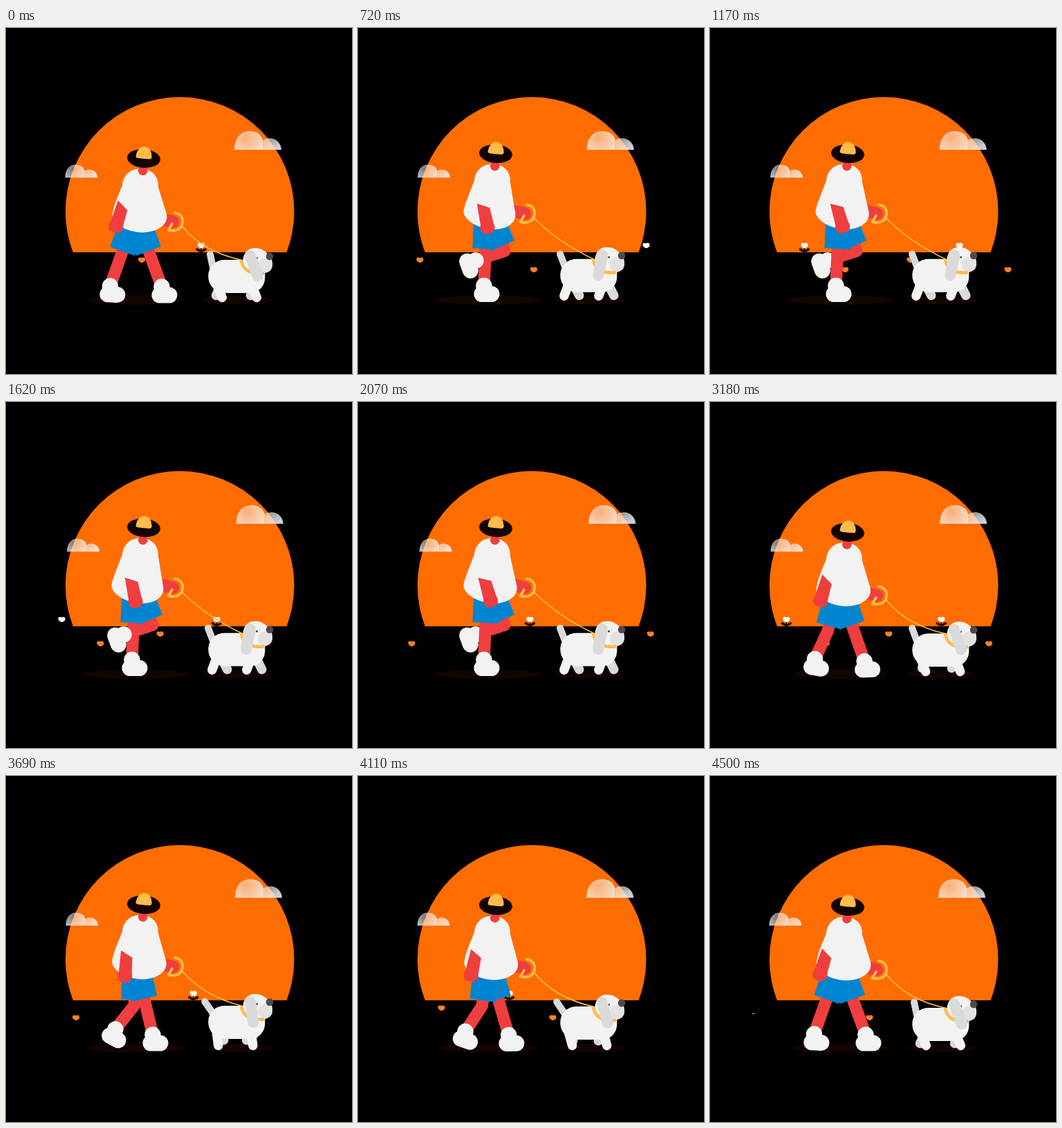
An HTML page with a canvas that plays this animation: 500 px wide and 500 px high, repeating every 4530 ms.

```html
<!DOCTYPE html>
<html lang="en">
<head>
<meta charset="utf-8">
<title>Sunset dog walk</title>
<style>
html, body { margin: 0; width: 100%; height: 100%; overflow: hidden; background: #000; }
canvas { display: block; width: 500px; height: 500px; }
</style>
</head>
<body>
<canvas id="stage" width="500" height="500"></canvas>
<script>
const ctx = document.getElementById('stage').getContext('2d');
const LOOP = 4530, STEP = 30, CYCLE = 900, TAU = Math.PI * 2;
const SUN = '#ff6d00', DARK = '#120400', SKIN = '#ef3e3e', WHITE = '#f2f2f2';
const BLUE = '#0085d0', GOLD = '#ffbc4d', GREY = '#dadada', ORANGE = '#ff8126';

const clamp = (v, lo, hi) => Math.min(hi, Math.max(lo, v));

function fillPath(color, build) {
  ctx.fillStyle = color;
  ctx.beginPath();
  build();
  ctx.fill();
}

function ellipse(x, y, rx, ry, color, angle = 0) {
  fillPath(color, () => ctx.ellipse(x, y, rx, ry, angle, 0, TAU));
}

const circle = (x, y, r, color) => ellipse(x, y, r, r, color);

function stroke(color, width, build, cap = 'round') {
  ctx.strokeStyle = color;
  ctx.lineWidth = width;
  ctx.lineCap = cap;
  ctx.lineJoin = 'round';
  ctx.beginPath();
  build();
  ctx.stroke();
}

function limb(points, width, color) {
  stroke(color, width, () => points.forEach(p => ctx.lineTo(p[0], p[1])));
}

function placed(x, y, angle, scale, draw) {
  ctx.save();
  ctx.translate(x, y);
  ctx.rotate(angle);
  ctx.scale(scale, scale);
  draw();
  ctx.restore();
}

// Smooth periodic curve through evenly spaced keys.
function cyclic(keys, phase) {
  const n = keys.length, pos = ((phase % 1) + 1) % 1 * n;
  const i = Math.floor(pos), s = pos - i;
  const [a, b, c, d] = [-1, 0, 1, 2].map(k => keys[(i + k + n) % n]);
  return b + s * ((c - a) / 2 + s * (a - 2.5 * b + 2 * c - d / 2 + s * (1.5 * (b - c) + (d - a) / 2)));
}

function drawScene() {
  ctx.fillStyle = '#000';
  ctx.fillRect(0, 0, 500, 500);
  ctx.save();
  ctx.beginPath();
  ctx.rect(0, 0, 500, 324.2);
  ctx.clip();
  circle(251.2, 265, 165.3, SUN);
  ctx.restore();
  ctx.fillStyle = '#120500';
  ctx.fillRect(48, 324.5, 12, 1);
  ctx.fillRect(71, 324.5, 377, 1);
}

function drawCloud(x, y, scale) {
  placed(x, y, 0, scale, () => {
    const big = ctx.createRadialGradient(16, 9, 2, 18, 11, 26);
    big.addColorStop(0, 'rgba(245,245,245,.5)');
    big.addColorStop(1, 'rgba(245,245,245,.82)');
    fillPath(big, () => {
      ctx.moveTo(0, 27);
      ctx.bezierCurveTo(0, 11, 8, 0, 22, 0);
      ctx.bezierCurveTo(32, 0, 39, 5, 41, 13);
      ctx.lineTo(41, 27);
    });
    const small = ctx.createLinearGradient(44, 10, 56, 27);
    small.addColorStop(0, 'rgba(240,240,240,.58)');
    small.addColorStop(1, 'rgba(240,240,240,.86)');
    fillPath(small, () => {
      ctx.moveTo(41, 13);
      ctx.bezierCurveTo(53, 6, 67, 13, 68, 27);
      ctx.lineTo(41, 27);
    });
  });
}

// Start x, ground y, speed in px/ms and colour of each flower row.
const flowerRows = [
  [282, 326, 0.1244, '#fff'],
  [196, 347, 0.1481, ORANGE],
  [348, 361, 0.1307, ORANGE]
];

function drawFlower(x, y, color) {
  const scale = clamp(Math.min(x - 58, 459 - x) / 15, 0, 1);
  if (!scale) return;
  placed(x, y, 0, scale, () => {
    limb([[0, -2], [0, -9]], 1.6, '#080200');
    ellipse(-4, -5, 4, 1.8, '#080200', 0.5);
    ellipse(4, -5, 4, 1.8, '#080200', -0.5);
    circle(-2.5, -13, 2.5, color);
    circle(2, -12.3, 3.1, color);
    fillPath(color, () => {
      ctx.moveTo(-4.8, -12.2);
      ctx.quadraticCurveTo(-3.6, -8.6, 0, -7.8);
      ctx.quadraticCurveTo(4.2, -8.7, 5, -11.8);
      ctx.lineTo(-1, -13.4);
    });
  });
}

const ankleX = [225, 212, 197, 182, 166, 150.5, 158, 159, 170, 205];
const ankleY = [374, 374, 373.5, 372.5, 372.5, 373, 366, 350, 336, 364];
const footTurn = [0, 0, 0, 0, 2, 3, 28, 54, 70, 28];

function drawLeg(phase, hipY) {
  const thigh = 64, shin = 44.2, hipX = 187;
  const ax = cyclic(ankleX, phase), ay = cyclic(ankleY, phase);
  const dx = ax - hipX, dy = ay - hipY, reach = Math.hypot(dx, dy);
  const bend = Math.acos(clamp((thigh ** 2 + reach ** 2 - shin ** 2) / (2 * thigh * reach), -1, 1));
  const angle = Math.atan2(dx, dy) + bend;
  const knee = [hipX + thigh * Math.sin(angle), hipY + thigh * Math.cos(angle)];
  limb([[hipX, hipY], knee, [ax, ay]], 17.5, SKIN);
  placed(ax, ay, cyclic(footTurn, phase) * Math.PI / 180, 1, () => {
    circle(0, 0, 11.7, WHITE);
    fillPath(WHITE, () => ctx.roundRect(-14.5, 0.5, 37, 23, 11.5));
  });
  placed(hipX, hipY, -angle, 1, () => {
    ctx.fillStyle = BLUE;
    ctx.fillRect(-19, 0, 38, 56);
  });
}

function drawShirt(c, s, bob) {
  const right = 230.5 + 2.2 * c + 1.2 * s, left = 153.8 + 0.8 * c, base = 293 + 2.5 * c;
  fillPath(WHITE, () => {
    ctx.moveTo(168, 224 + bob);
    ctx.bezierCurveTo(169, 209 + bob, 180, 199.5 + bob, 194, 199.5 + bob);
    ctx.bezierCurveTo(209, 199.5 + bob, 221, 209 + bob, 220, 226 + bob);
    ctx.lineTo(right - 1, base - 28);
    ctx.bezierCurveTo(right + 4, base - 10, 216, base, 196, base);
    ctx.bezierCurveTo(176, base, 148, base - 14, left, base - 30);
    ctx.quadraticCurveTo(155, base - 38, 168, 224 + bob);
  });
}

function drawHead(bob) {
  circle(197.8, 202.5 + bob, 6.8, SKIN);
  placed(199, 184.8 + bob, 0.08, 1, () => {
    ellipse(0, 0, 24, 13.4, DARK);
    fillPath(GOLD, () => {
      ctx.moveTo(-11.5, -2.5);
      ctx.bezierCurveTo(-11, -11, -6, -17, 0, -17);
      ctx.bezierCurveTo(7, -17, 11, -11, 11.5, -2.5);
      ctx.quadraticCurveTo(11.5, -0.2, 9, 0.2);
      ctx.quadraticCurveTo(0, 0.8, -8, 0.2);
      ctx.quadraticCurveTo(-12, -0.3, -11.5, -2.5);
    });
  });
}

function drawNearArm(c, s) {
  const handX = 176.2 - 17.7 * c + 2.5 * s;
  placed(176, 232, -Math.asin((handX - 176) / 60), 1, () => {
    fillPath(SKIN, () => {
      ctx.moveTo(-8.5, 20.5);
      ctx.lineTo(8.5, 30);
      ctx.lineTo(9.5, 60);
      ctx.lineTo(-10, 60);
    });
    fillPath(SKIN, () => ctx.roundRect(-11, 48.5, 21, 18, 8));
  });
}

function drawHandle(handY) {
  placed(241, handY, 0, 1, () => stroke(GOLD, 3.6, () => {
    ctx.moveTo(2.5, -13.5);
    ctx.bezierCurveTo(13, -12, 15.5, -4, 14, 2);
    ctx.bezierCurveTo(12, 11, 4, 14, -6.5, 11.5);
    ctx.lineTo(-1, 2.5);
  }));
}

function drawPerson(phase, c, s) {
  const bob = 3.75 * c, handY = 274 + 6.5 * c;
  ellipse(188.5, 393, 73 - 4.5 * c, 7, DARK);
  drawLeg(phase + 0.5, 266.25 + bob);
  drawLeg(phase, 266.25 + bob);
  limb([[222, handY - 5], [241, handY - 0.5]], 18, SKIN);
  drawShirt(c, s, bob);
  drawNearArm(c, s);
  drawHead(bob);
}

function drawLeash(c, handY, dogY) {
  stroke(GOLD, 1.7, () => {
    ctx.moveTo(255, handY + 6.5);
    ctx.quadraticCurveTo(287.5 - 3.5 * c, 316 + 7 * c, 341, 335.5 + dogY);
  });
}

function drawDogLegs(c, s, far) {
  const lift = Math.max(0, far ? s : -s);
  [[0, 6], [50, -12]].forEach(([shift, drift]) => {
    const hipX = (far ? 311.5 : 304.3) + shift;
    const swing = far ? -8 * c + drift * lift + 3 * Math.max(0, -s) : 8 * c;
    const y = far ? 386.5 - 5 * lift : 389.5 - 4 * lift;
    limb([[hipX, 370], [hipX + swing, y]], 13.5, far ? GREY : WHITE);
  });
}

function drawDog(c, s, bob, wag) {
  const dy = 1.7 * bob - 1.7;
  ellipse(335, 393, 50.5, 6, DARK);
  drawDogLegs(c, s, true);
  limb([[299, 346 + dy], [290.7 + 4.3 * wag, 327 + dy * 0.3]], 10, GREY);
  drawDogLegs(c, s, false);
  ctx.save();
  ctx.translate(0, dy);
  fillPath(WHITE, () => ctx.roundRect(292.3, 335, 82, 48, [23, 14, 22, 24]));
  fillPath(WHITE, () => {
    ctx.moveTo(342.5, 338);
    ctx.bezierCurveTo(342, 325, 350, 317.8, 360, 318);
    ctx.bezierCurveTo(371, 318, 376, 324, 381, 329);
    ctx.bezierCurveTo(388, 338, 386, 353, 373, 354);
    ctx.bezierCurveTo(357, 357, 344, 350, 342.5, 338);
  });
  circle(374.5, 343, 10.5, '#e2e2e2');
  stroke(GOLD, 4.6, () => {
    ctx.moveTo(340, 335.5);
    ctx.quadraticCurveTo(343, 357, 373, 354.5);
  }, 'butt');
  ellipse(381, 330, 5.3, 5.4, '#4c4c4c');
  circle(362.5, 332.5, 1.5, '#444');
  limb([[353, 329.5], [354.5 + 9.2 * c, 359 - Math.abs(c) * 0.8]], 16, GREY);
  ctx.restore();
  return dy;
}

function render(time) {
  const t = Math.floor(time % LOOP / STEP) * STEP;
  const phase = t / CYCLE, turn = TAU * phase;
  const c = Math.cos(2 * turn);
  const drift = 1.65 * (1 - Math.cos(TAU * t / 4500));

  drawScene();
  drawCloud(330 + drift, 149, 1);
  drawCloud(85.5 + drift, 197.5, 0.69);
  for (const [x, y, speed, color] of flowerRows) {
    for (let k = 0; k < 3; k++) drawFlower(x + speed * (1800 * k - t), y, color);
  }
  drawPerson(phase, c, Math.sin(turn));
  const dogY = drawDog(c, Math.sin(2 * turn), Math.cos(4 * turn), Math.cos(6 * turn));
  const handY = 274 + 6.5 * c;
  drawLeash(c, handY, dogY);
  drawHandle(handY);
}

const start = performance.now();
function tick() {
  render(performance.now() - start);
  requestAnimationFrame(tick);
}
tick();
</script>
</body>
</html>
```
